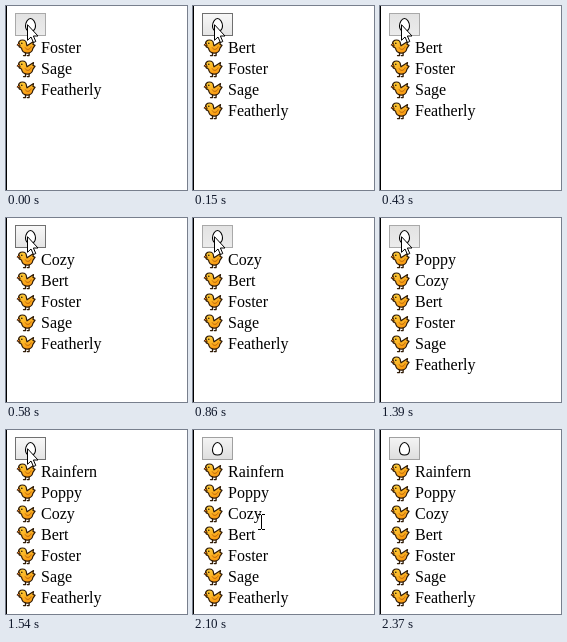
An HTML page for the animation above (2650 ms loop, 181 px wide and 184 px high).

```html
<!DOCTYPE html>
<html lang="en">
<head>
<meta charset="utf-8">
<title>Chick list</title>
<style>
  html, body { margin: 0; width: 100%; height: 100%; overflow: hidden; background: #fff; }
  svg { display: block; width: 181px; height: 184px; }
  text { font: 16px "Liberation Serif", "Times New Roman", serif; fill: #000; }
</style>
</head>
<body>
<svg viewBox="0 0 181 184">
  <defs>
    <linearGradient id="face" x2="0" y2="1">
      <stop offset="0" stop-color="#f4f4f4"/>
      <stop offset="1" stop-color="#dedede"/>
    </linearGradient>
    <linearGradient id="faceHover" x2="0" y2="1">
      <stop offset="0" stop-color="#f8f8f8"/>
      <stop offset="1" stop-color="#e4e4e4"/>
    </linearGradient>
    <linearGradient id="faceDown" x2="0" y2="1">
      <stop offset="0" stop-color="#e2e2e2"/>
      <stop offset="1" stop-color="#ececec"/>
    </linearGradient>
    <linearGradient id="down" x2=".4" y2="1">
      <stop offset="0" stop-color="#ffd23c"/>
      <stop offset="1" stop-color="#f99a12"/>
    </linearGradient>
    <g id="chick" stroke="#2e1a06" stroke-linejoin="round" stroke-linecap="round">
      <path d="M9 13.5V16.6H7M12.6 13.5V16.6H10.8" fill="none" stroke-width="1.3"/>
      <path d="M2 5C2 2.6 3.8 1 6 1C8.4 1 9.9 2.7 10 5L10.5 6.8L17 2.6L16.5 5.4L18.6 6.2L16.4 9.3C15.9 12.6 13.2 14.4 10.2 14.1C7.2 13.7 5.3 11.7 5 9C3.2 8.7 2 7 2 5Z" fill="url(#down)" stroke-width="1.2"/>
      <path d="M2.4 4.2L.4 6L3.4 7.1Z" fill="#f47b20" stroke-width=".8"/>
      <path d="M8.8 8.8C10 11.3 13.4 11 14.6 7.8" fill="none" stroke="#b5600a" stroke-width=".9"/>
      <circle cx="5.3" cy="4.2" r=".8" fill="#1d1206" stroke="none"/>
    </g>
  </defs>
  <rect width="181" height="184" fill="#fff"/>
  <rect width="1" height="184"/>
  <rect id="button" x="9.5" y="7.5" width="30" height="22"/>
  <path d="M24.5 12.5C27.3 12.5 29.5 16.6 29.5 19.9C29.5 23.2 27.5 25 24.5 25C21.5 25 19.5 23.2 19.5 19.9C19.5 16.6 21.7 12.5 24.5 12.5Z" fill="#fff" stroke="#000" stroke-width="1.1"/>
  <g id="list"></g>
  <path id="arrow" d="M.5 .7V16.3L4 13L6.5 18.5L8.8 17.5L6.4 12H11Z" fill="#fff" stroke="#000"/>
  <path id="beam" d="M65 84.5H68M69 84.5H72M68.5 85V99M65 99.5H68M69 99.5H72" fill="none" stroke="#000"/>
</svg>
<script>
const LOOP = 2650, ROW = 21;
const names = ["Featherly", "Sage", "Foster", "Bert", "Cozy", "Poppy", "Rainfern"];
const hatchTimes = [0, 0, 0, 150, 580, 990, 1540];
const presses = [[0, 150], [430, 580], [860, 990], [1390, 1540]];
const LEAVE = 2100, AWAY = 2230, GONE = 2370;
const looks = {
  idle: ["url(#face)", "#a0a0a0"],
  hover: ["url(#faceHover)", "#707070"],
  pressed: ["url(#faceDown)", "#a9a9a9"]
};

const byId = id => document.getElementById(id);
const show = (el, on) => el.setAttribute("visibility", on ? "visible" : "hidden");
const button = byId("button"), arrow = byId("arrow"), beam = byId("beam"), list = byId("list");

list.innerHTML = names.map(name =>
  `<g><use href="#chick" x="10.5" y="33"/><text x="35" y="47">${name}</text></g>`).join("");
const rows = [...list.children];

function draw(t) {
  const count = hatchTimes.filter(start => t >= start).length;
  rows.forEach((row, i) => {
    row.setAttribute("transform", `translate(0 ${(count - 1 - i) * ROW})`);
    row.setAttribute("display", i < count ? "inline" : "none");
  });

  const onButton = t < LEAVE;
  const pressed = presses.some(([from, to]) => t >= from && t < to);
  const [fill, stroke] = looks[pressed ? "pressed" : onButton ? "hover" : "idle"];
  button.setAttribute("fill", fill);
  button.setAttribute("stroke", stroke);

  arrow.setAttribute("transform", onButton ? "translate(21 18)" : "translate(129 174)");
  show(arrow, onButton || (t >= AWAY && t < GONE));
  show(beam, t >= LEAVE && t < AWAY);
}

const start = performance.now();
function tick() {
  draw((performance.now() - start) % LOOP);
  requestAnimationFrame(tick);
}
tick();
</script>
</body>
</html>
```
